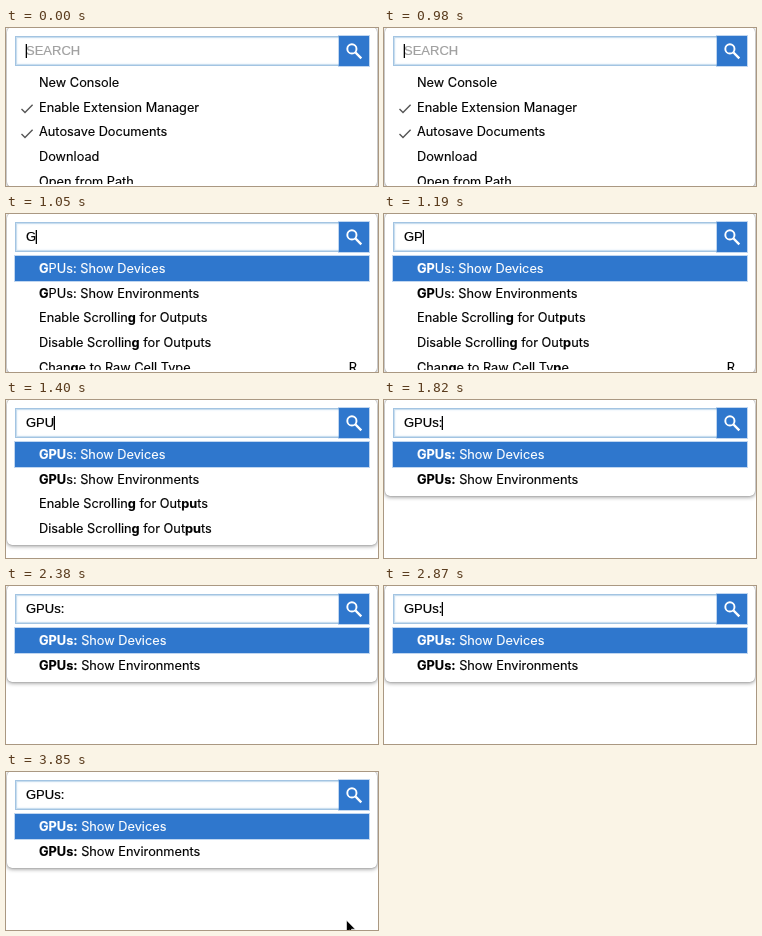
Animation of 372x158 px, one loop 3920 ms. Source, as an HTML page:

```html
<!DOCTYPE html>
<html lang="en">
<head>
<meta charset="utf-8">
<title>Command palette</title>
<style>
  html, body { margin: 0; width: 100%; height: 100%; overflow: hidden; background: #fff; }
  #stage { position: relative; width: 372px; height: 158px; overflow: hidden; background: #fff; }
  #stage div, #stage svg { position: absolute; box-sizing: border-box; }
  #panel {
    left: 1px; top: -1px; width: 370px; background: #fff; border-radius: 5px;
    box-shadow: 0 0 1px rgba(0,0,0,.35), 0 1px 4px rgba(0,0,0,.45);
  }
  #field {
    left: 9px; top: 8px; width: 354px; height: 30px; background: #fff;
    border: 1px solid #a3c4e2; box-shadow: inset 0 0 0 1px #c9deef, inset 0 0 3px #b5d3ee;
  }
  #button { left: 333px; top: 8px; width: 30px; height: 30px; }
  #button, .row.active { background: #2f77cd; box-shadow: 0 0 0 1px rgba(47,119,205,.3); }
  #query {
    left: 20px; top: 15px; white-space: pre;
    font: 13px/16px "Liberation Sans", Arial, sans-serif; -webkit-text-stroke: .2px;
  }
  #caret { top: 16px; width: 1px; height: 14px; background: #000; box-shadow: -1px 0 rgba(0,0,0,.3); }
  #list { left: 0; top: 41px; width: 372px; height: 114.5px; overflow: hidden; }
  .row {
    left: 9px; width: 354px; height: 24.7px; padding-left: 24px; white-space: pre;
    font: 12.76px/25.9px Inter, sans-serif; color: #000; -webkit-text-stroke: .15px;
  }
  .row.active { color: #fff; }
  .row b { font-weight: 700; }
  .row .key { right: 12px; top: 0; }
  .row svg { left: 5px; top: 8.3px; }
</style>
</head>
<body>
<div id="stage">
  <div id="panel"></div>
  <div id="field"></div>
  <div id="button">
    <svg width="30" height="30" fill="none" stroke="#fff">
      <circle cx="12.9" cy="12.9" r="4.6" stroke-width="1.9"/>
      <path d="M16.5 16.5L22.3 22.3" stroke-width="2.4"/>
    </svg>
  </div>
  <div id="query"></div>
  <div id="caret"></div>
  <div id="list"></div>
  <svg id="pointer" width="14" height="18" style="left:339px;top:147px">
    <path d="M1.5 1.2V13.5L4.3 10.9L6.2 15.4L8.3 14.5L6.4 10.2H10.3Z" fill="#000" stroke="#fff" stroke-width=".6"/>
  </svg>
</div>
<script>
const $ = id => document.getElementById(id);
const LOOP = 3920, PITCH = 24.7;
const typed = [[0, ''], [1050, 'G'], [1190, 'GP'], [1400, 'GPU'], [1680, 'GPUs'], [1820, 'GPUs:']];
const caretOff = [[140, 630], [2380, 2870], [3430, LOOP]];
const startRows = [
  { label: 'New Console' },
  { label: 'Enable Extension Manager', on: true },
  { label: 'Autosave Documents', on: true },
  { label: 'Download' },
  { label: 'Open from Path' }
];
const commands = [
  { label: 'GPUs: Show Devices' },
  { label: 'GPUs: Show Environments' },
  { label: 'Enable Scrolling for Outputs' },
  { label: 'Disable Scrolling for Outputs' },
  { label: 'Change to Raw Cell Type', key: 'R' }
];
const check = '<svg width="15" height="12"><path d="M1.5 6L5 9.4L12.6 1.8" fill="none" stroke="#555" stroke-width="1.4"/></svg>';

// Bold each query letter in order; null when a letter is missing.
function match(label, query) {
  let i = 0, html = '';
  for (const ch of label) {
    const hit = i < query.length && ch.toLowerCase() === query[i].toLowerCase();
    if (hit) i++;
    html += hit ? `<b>${ch}</b>` : ch;
  }
  return i === query.length ? html.replaceAll('</b><b>', '') : null;
}

function showQuery(query) {
  const rows = (query ? commands : startRows)
    .map(item => ({ ...item, html: match(item.label, query) }))
    .filter(item => item.html !== null);
  $('list').innerHTML = rows.map((item, i) =>
    `<div class="row${query && i === 0 ? ' active' : ''}" style="top:${1 + i * PITCH}px">` +
    (item.on ? check : '') + item.html +
    (item.key ? `<div class="key">${item.key}</div>` : '') + '</div>').join('');
  $('panel').style.height = Math.min(160, 47.5 + rows.length * PITCH) + 'px';
  $('query').textContent = query || 'SEARCH';
  $('query').style.color = query ? '#000' : '#a0a0a0';
  $('caret').style.left = 20 + (query ? $('query').getBoundingClientRect().width : 0) + 'px';
}

let shown = null;
function draw(now) {
  const t = now % LOOP;
  const query = typed.filter(([at]) => t >= at).pop()[1];
  if (query !== shown) showQuery(shown = query);
  const hidden = caretOff.some(([from, to]) => t >= from && t < to);
  $('caret').style.visibility = hidden ? 'hidden' : 'visible';
  $('pointer').style.visibility = t >= 3850 ? 'visible' : 'hidden';
}

const start = performance.now();
function tick() {
  draw(performance.now() - start);
  requestAnimationFrame(tick);
}
tick();
</script>
</body>
</html>
```
